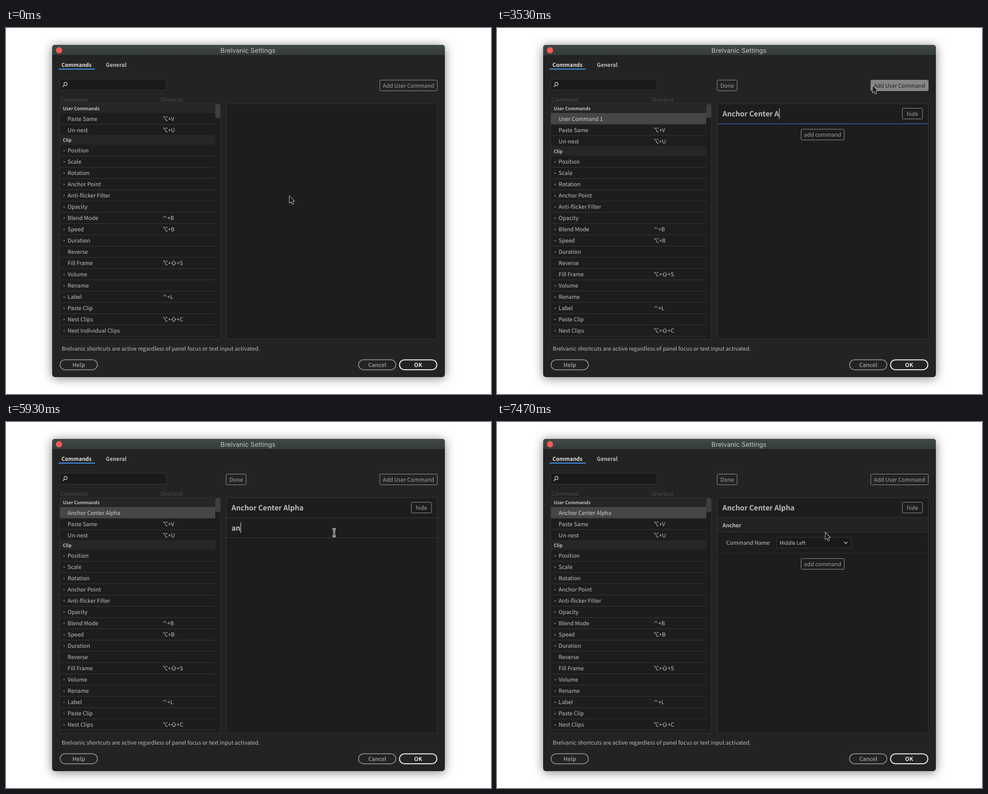
Write an HTML page with a canvas that moves like this. It is 862 by 650 pixels and loops after 8 s.

```html
<!DOCTYPE html>
<html lang="en">
<head>
<meta charset="utf-8">
<title>Command settings</title>
<style>
html, body { margin: 0; width: 100%; height: 100%; overflow: hidden; background: #fff; }
canvas { display: block; width: 862px; height: 650px; }
</style>
</head>
<body>
<canvas id="stage"></canvas>
<script>
const WIDTH = 862, HEIGHT = 650, LOOP = 8000, TICK = 200 / 3;
const SANS = '"Noto Sans CJK JP", "Noto Sans CJK SC", "Noto Sans CJK KR", "Noto Sans CJK", sans-serif';
const HEADER_H = 16.3, ROW_H = 20;

const canvas = document.getElementById('stage');
const ratio = window.devicePixelRatio || 1;
canvas.width = WIDTH * ratio;
canvas.height = HEIGHT * ratio;
const ctx = canvas.getContext('2d');
ctx.scale(ratio, ratio);
ctx.textRendering = 'geometricPrecision';

// '#' marks a section, '*' a bulleted row, '|' splits off the shortcut.
const COMMANDS = ['Paste Same|⌥+V', 'Un-nest|⌥+U', '#Clip', '*Position', '*Scale', '*Rotation',
  '*Anchor Point', '*Anti-flicker Filter', '*Opacity', '*Blend Mode|^+B', '*Speed|⌥+B', '*Duration',
  'Reverse', 'Fill Frame|⌥+⇧+S', '*Volume', '*Rename', '*Label|^+L', '*Paste Clip',
  '*Nest Clips|⌥+⇧+C', '*Nest Individual Clips', '*'];

const BALANCE = ['#Video Effects', 'Color Balance (RGB)', 'Color Balance (HLS)', 'Color Balance'];
const AUDIO = ['#Audio Effects', 'Balance', 'Vocal Enhancer'];
const PLUGINS = ['#Extensions & Plugins', 'Anchor'];
const RESULTS = [
  [6000, { thumb: 60, items: ['#Clip', 'Anchor Point', 'Anti-flicker Filter', 'Rotation', 'Duration',
    'Nest Individual Clips', ...BALANCE, 'Channel Blur', 'Lens Distortion', 'Change Color', ...AUDIO, ...PLUGINS] }],
  [6130, { thumb: 318, items: ['#Clip', 'Anchor Point', ...BALANCE, ...AUDIO, ...PLUGINS] }],
  [6270, { thumb: 0, items: ['#Clip', 'Anchor Point', ...PLUGINS] }]
];

const NAME = 'Anchor Center Alpha';
const NAME_KEYS = [2000, 2070, 2130, 2200, 2330, 2400, 2670, 2670, 2800, 2870, 2930, 3070, 3130,
  3330, 3530, 3600, 3670, 3800, 3870];
const QUERY_KEYS = [5730, 5930, 6070, 6130, 6270, 6400];
const CREATED = 1070, SEARCHING = 4870, PICKED = 7470;

const typed = (text, keys, t) => text.slice(0, keys.filter(k => k <= t).length);
const latest = (steps, t) => steps.filter(s => s[0] <= t).map(s => s[1]).pop();
const between = (t, from, to) => t >= from && t < to;

function text(str, x, y, { size = 9.8, color = '#c2c2c2', bold = false, align = 'left', family = SANS } = {}) {
  ctx.font = `${bold ? 700 : 400} ${size}px ${family}`;
  ctx.fillStyle = color;
  ctx.textAlign = align;
  ctx.fillText(str, x, y);
  return ctx.measureText(str).width;
}

function rect(x, y, w, h, fill) {
  ctx.fillStyle = fill;
  ctx.fillRect(x, y, w, h);
}

function box(x, y, w, h, radius, fill, stroke, line = 1) {
  ctx.beginPath();
  ctx.roundRect(x, y, w, h, radius);
  if (fill) { ctx.fillStyle = fill; ctx.fill(); }
  if (stroke) { ctx.strokeStyle = stroke; ctx.lineWidth = line; ctx.stroke(); }
}

function path(points, color, width, close) {
  ctx.beginPath();
  points.forEach(([x, y], i) => i ? ctx.lineTo(x, y) : ctx.moveTo(x, y));
  if (close) ctx.closePath();
  ctx.strokeStyle = color;
  ctx.lineWidth = width;
  ctx.stroke();
}

function button(label, x, y, w, cursor) {
  const h = 19;
  const over = cursor.x >= x && cursor.x <= x + w && cursor.y >= y && cursor.y <= y + h;
  box(x, y, w, h, 2, over ? '#858585' : null, '#858585');
  text(label, x + w / 2, y + 13.3, { color: over ? '#202020' : '#a2a2a2', align: 'center' });
}

function pill(label, x, color, line) {
  box(x, 589.3, 66.5, 17.6, 8.8, null, color, line);
  text(label, x + 33.2, 601.7, { bold: true, color, align: 'center' });
}

function shortcut(keys, x, y) {
  const color = '#c2c2c2';
  for (const key of keys) {
    if (key === '⌥') {
      path([[x + .5, y - 7], [x + 3, y - 7], [x + 6, y - .4], [x + 8.6, y - .4]], color, 1);
      path([[x + 5.2, y - 7], [x + 8.6, y - 7]], color, 1);
      x += 9.4;
    } else if (key === '⇧') {
      path([[x + 4.8, y - 7.8], [x + 8.8, y - 3.6], [x + 6.8, y - 3.6], [x + 6.8, y - .3],
        [x + 2.8, y - .3], [x + 2.8, y - 3.6], [x + .8, y - 3.6]], color, .9, true);
      x += 10;
    } else if (key === '^') {
      path([[x + .8, y - 4.4], [x + 3.8, y - 7.2], [x + 6.8, y - 4.4]], color, 1);
      x += 8;
    } else {
      x += text(key, x, y, { color });
    }
  }
}

function rows(items, left, right, top, labelX, headX, selected) {
  let y = top;
  for (const item of items) {
    if (item[0] === '#') {
      rect(left, y, right - left, HEADER_H, '#262626');
      text(item.slice(1), headX, y + 11, { size: 8.1, bold: true, color: '#c4c4c4' });
      y += HEADER_H;
      continue;
    }
    const [label, keys] = item.replace('*', '').split('|');
    if (item === selected) rect(left, y, right - left, ROW_H, '#464646');
    if (item[0] === '*') rect(102.4, y + 9.6, 1.7, 1.7, '#b0b0b0');
    text(label, labelX, y + 13.8, { color: item === selected ? '#d2d2d2' : '#c2c2c2' });
    if (keys) shortcut(keys, 278.5, y + 13.8);
    y += ROW_H;
    rect(left, y - .5, right - left, 1, '#343434');
  }
}

function clipped(x, y, w, h, draw) {
  ctx.save();
  ctx.beginPath();
  ctx.rect(x, y, w, h);
  ctx.clip();
  draw();
  ctx.restore();
}

function drawWindow() {
  rect(0, 0, WIDTH, HEIGHT, '#fff');
  ctx.save();
  ctx.shadowColor = 'rgba(0,0,0,.5)';
  ctx.shadowBlur = 18 * ratio;
  ctx.shadowOffsetY = 2 * ratio;
  box(82, 30, 698, 590, 5, '#232323');
  ctx.restore();

  const bar = ctx.createLinearGradient(0, 30, 0, 49);
  bar.addColorStop(0, '#414848');
  bar.addColorStop(1, '#343a3a');
  box(82, 30, 698, 19, [5, 5, 0, 0], bar);
  rect(82, 48.5, 698, 1, '#191b1b');
  ctx.beginPath();
  ctx.arc(94.3, 39.6, 5.5, 0, 2 * Math.PI);
  ctx.fillStyle = '#fc5b57';
  ctx.fill();
  text('Brelvanic Settings', 430, 44, { size: 11.5, color: '#bfc3c3', align: 'center', family: 'Inter, sans-serif' });

  text('Commands', 98.5, 68.7, { size: 9.6, bold: true, color: '#e4e4e4' });
  text('General', 177.5, 68.7, { size: 9.6, bold: true, color: '#c0c0c0' });
  rect(93.5, 72, 64.5, 2, '#3a86d2');

  box(95.8, 91, 189, 19.5, 0, '#1a1a1a', '#333');
  ctx.beginPath();
  ctx.arc(105.8, 99.4, 2.8, 0, 2 * Math.PI);
  ctx.strokeStyle = '#c4c4c4';
  ctx.lineWidth = 1.1;
  ctx.stroke();
  path([[103.8, 101.4], [100.8, 104.4]], '#c4c4c4', 1.4);

  text('Command', 96.7, 131.3, { size: 9.9, color: '#4c4c4c' });
  text('Shortcut', 274, 131.3, { size: 9.9, color: '#4c4c4c' });
  text('Brelvanic shortcuts are active regardless of panel focus or text input activated.', 99, 573.2, { size: 9.75, color: '#bcbcbc' });
  pill('Help', 96, '#8e8e8e', 1.5);
  pill('Cancel', 626.5, '#8e8e8e', 1.5);
  pill('OK', 699.3, '#ececec', 1.8);
}

function drawList(t) {
  box(95.5, 134.5, 285.5, 418, 0, '#1d1d1d', '#313131');
  const added = t >= SEARCHING ? NAME : 'User Command 1';
  const items = ['#User Commands', ...(t >= CREATED ? [added] : []), ...COMMANDS];
  clipped(96, 135, 276, 417.5, () => rows(items, 96, 372, 134.7, 109.6, 101, added));
  box(372, 135, 9, 25, 4, '#3e3e3e');
}

function caret(x, y) {
  rect(x, y, 1, 18.5, '#d0d0d0');
}

function field(value, y, color = '#bebebe') {
  return text(value, 400.8, y, { size: 12.7, bold: true, color });
}

function drawTitle(t, right) {
  const name = typed(NAME, NAME_KEYS, t);
  if (!name) rect(401, 143, 107.3, 19, '#587ca5');
  const width = field(name || 'User Command 1', 157.2);
  if (between(t, 2000, 4400)) caret(401 + width, 143);
  rect(392, 169.4, right - 392, 1.2, t < SEARCHING ? '#2f6ca8' : '#343434');
}

function drawSearch(t, found, right) {
  const query = typed('anchor', QUERY_KEYS, t);
  const width = query ? field(query, 192.6) : (field('command name', 192.6, '#333'), 0);
  if (!between(t, 5470, 5730) && t < 6930) caret(401 + width, 178.5);
  rect(392, 205, right - 392, 1, '#343434');
  if (!found) return;
  const end = found.thumb ? 747.5 : 757;
  const selected = t >= 7070 ? 'Anchor' : 'Anchor Point';
  clipped(392, 135, 366, 417.5, () => rows(found.items, 392, end, 205.5, 407.6, 400.8, selected));
  if (found.thumb) box(757, 135, 9, found.thumb, 4, '#3e3e3e');
}

function drawPicked(cursor) {
  rect(392, 170.5, 374, 24.5, '#222');
  text('Anchor', 400.8, 186.5, { size: 9.5, bold: true });
  rect(392, 195, 374, 1, '#323232');
  text('Command Name', 407.6, 218.4);
  box(497, 204.8, 132.5, 19, 1, '#191919', '#353535');
  text('Middle Left', 502, 217.5, { size: 9 });
  path([[617, 213], [620, 216], [623, 213]], '#c2c2c2', 1.2);
  rect(392, 232.5, 374, 1, '#323232');
  button('add command', 540.5, 242.5, 76.5, cursor);
}

function drawPanel(t, cursor) {
  box(391.5, 134.5, 375, 418, 0, '#1d1d1d', '#313131');
  button('Add User Command', 664.3, 92.5, 102.2, cursor);
  if (t < CREATED) return;
  const searching = between(t, SEARCHING, PICKED);
  const found = searching ? latest(RESULTS, t) : null;
  const scrolls = Boolean(found && found.thumb);
  const right = scrolls ? 757 : 766;
  button('Done', 391.3, 92.5, 35.5, cursor);
  drawTitle(t, right);
  button('hide', scrolls ? 711.5 : 720.5, 142.5, 35.7, cursor);
  if (searching) drawSearch(t, found, right);
  else if (t >= PICKED) drawPicked(cursor);
  else button('add command', 540.5, 179.8, 76.5, cursor);
}

function pointerAt(t) {
  const now = Math.floor((t + 4) / TICK) * TICK;
  const ease = (from, span) => {
    const p = Math.min(1, Math.max(0, (now - from) / span));
    return p * p * (3 - 2 * p);
  };
  const out = ease(2 * TICK, 7 * TICK), back = ease(62 * TICK, 8 * TICK);
  return { x: 503.3 + 163.7 * out - 84 * back, y: 297.3 - 196 * out + 93.7 * back };
}

function drawPointer(t, { x, y }) {
  ctx.save();
  ctx.lineJoin = 'round';
  if (between(t, 5000, PICKED)) {
    for (const [color, width] of [['#e8e8e8', 3], ['#1c1c1c', 1]]) {
      path([[580.2, 190], [582, 190], [583.2, 191.4], [584.4, 190], [586.2, 190]], color, width);
      path([[583.2, 191], [583.2, 202]], color, width);
      path([[580.2, 203], [582, 203], [583.2, 201.6], [584.4, 203], [586.2, 203]], color, width);
      path([[581.4, 198.5], [585, 198.5]], color, width);
    }
  } else {
    ctx.translate(x, y);
    path([[.5, 1], [.5, 13.6], [3.4, 10.9], [5.4, 15.6], [7.6, 14.7], [5.6, 10.1], [9.3, 10]], '#f2f2f2', 1.2, true);
    ctx.fillStyle = '#1c1c1c';
    ctx.fill();
  }
  ctx.restore();
}

const start = performance.now();
function frame() {
  const t = (performance.now() - start) % LOOP;
  const cursor = pointerAt(t);
  drawWindow();
  drawList(t);
  drawPanel(t, cursor);
  drawPointer(t, cursor);
  requestAnimationFrame(frame);
}
frame();
</script>
</body>
</html>
```
